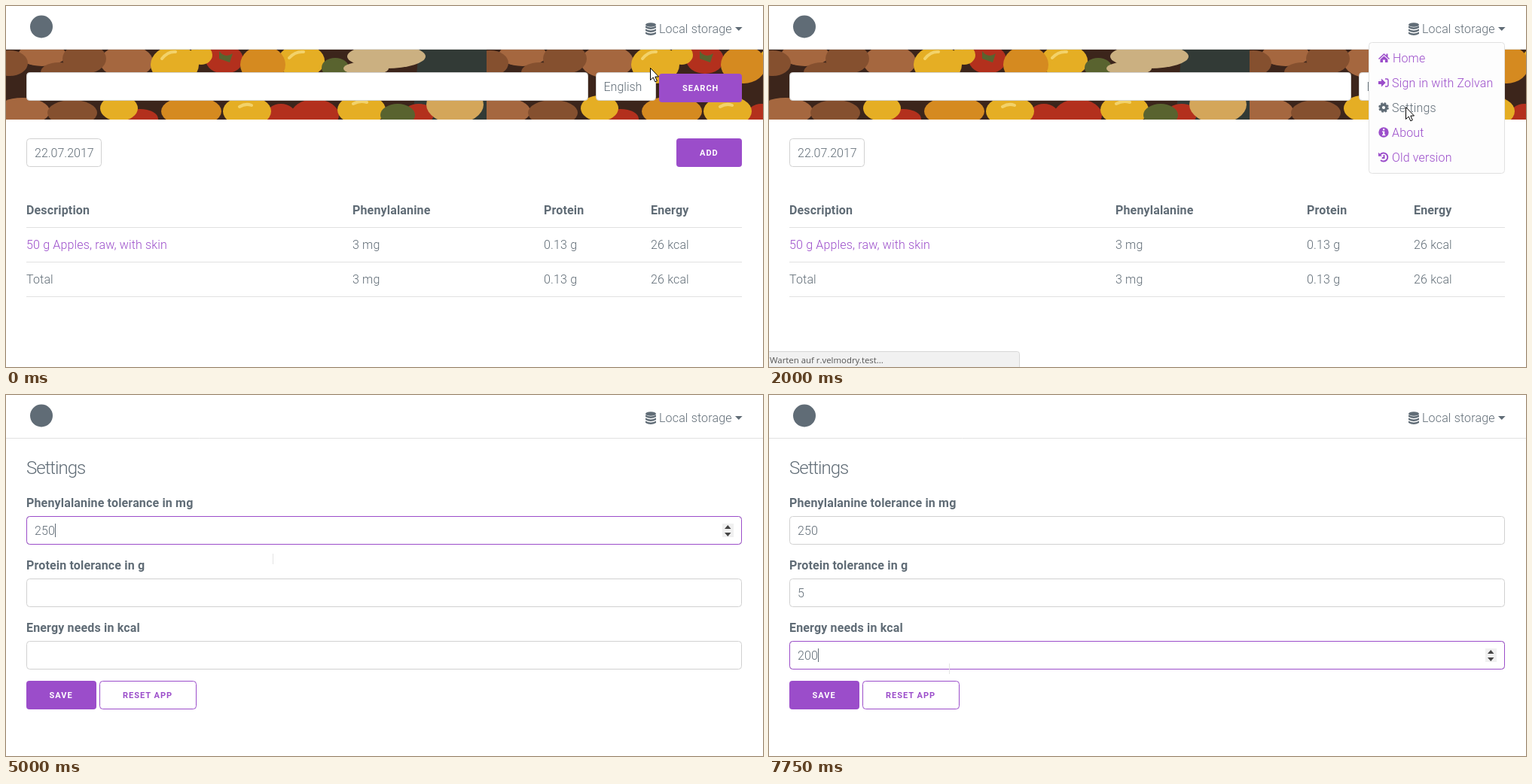
These frames come from a looping animation (1005x480 px, 8000 ms). An HTML page:

```html
<!DOCTYPE html>
<html lang="en">
<head>
<meta charset="utf-8">
<title>Diet diary settings</title>
<style>
html, body { margin: 0; width: 100%; height: 100%; overflow: hidden; background: #fff; }
svg { display: block; color: #606c76; }
text { font: 300 16px Roboto, "Liberation Sans", sans-serif; letter-spacing: .16px; fill: currentColor; white-space: pre; }
.b { font-weight: 700; }
.v { letter-spacing: 0; }
.btn { font-size: 11px; font-weight: 700; letter-spacing: 1px; }
.title { font-size: 24px; letter-spacing: -1px; }
.status text { font: 400 11.4px "Open Sans", "Noto Sans", sans-serif; letter-spacing: 0; fill: #555; }
.link { color: #9b4dca; }
.ink { fill: currentColor; }
.line { fill: none; stroke: currentColor; }
.box { fill: #fff; stroke: #d1d1d1; }
.focus .ring { fill: none; stroke: #9b4dca; }
.rule { stroke: #e1e1e1; }

/* 32 steps of 250 ms: one step is 3.125% */
.t { animation: 8s step-end infinite; }
.home { animation-name: home; }
.settings { animation-name: settings; }
.menu { animation-name: menu; }
.hover-home { animation-name: hover-home; }
.hover-sign { animation-name: hover-sign; }
.hover-set { animation-name: hover-set; }
.status { animation-name: status; }
.waiting { animation-name: waiting; }
.connecting { animation-name: connecting; }
.focus1 { animation-name: focus1; }
.focus2 { animation-name: focus2; }
.focus3 { animation-name: focus3; }
.key1 { animation-name: key1; }
.key2 { animation-name: key2; }
.key3 { animation-name: key3; }
.key4 { animation-name: key4; }
.key5 { animation-name: key5; }
.key6 { animation-name: key6; }
.key7 { animation-name: key7; }
.caret { animation-name: caret; }
.cursor { animation-name: cursor; }
.arrow { animation-name: arrow; }
.hand { animation-name: hand; }
.beam { animation-name: beam; }

@keyframes home { from { opacity: 1 } 28.125%, to { opacity: 0 } }
@keyframes settings { from { opacity: 0 } 28.125%, to { opacity: 1 } }
@keyframes menu { from { opacity: 0 } 9.375% { opacity: 1 } 28.125%, to { opacity: 0 } }
@keyframes hover-home { 12.5% { color: #606c76 } from, 15.625%, to { color: #9b4dca } }
@keyframes hover-sign { 15.625% { color: #606c76 } from, 18.75%, to { color: #9b4dca } }
@keyframes hover-set { 18.75% { color: #606c76 } from, 28.125%, to { color: #9b4dca } }
@keyframes status { from { opacity: 0 } 21.875% { opacity: 1 } 56.25%, to { opacity: 0 } }
@keyframes waiting { from { opacity: 1 } 37.5%, to { opacity: 0 } }
@keyframes connecting { from { opacity: 0 } 37.5%, to { opacity: 1 } }
@keyframes focus1 { from { opacity: 0 } 40.625% { opacity: 1 } 68.75%, to { opacity: 0 } }
@keyframes focus2 { from { opacity: 0 } 68.75% { opacity: 1 } 81.25%, to { opacity: 0 } }
@keyframes focus3 { from { opacity: 0 } 81.25%, to { opacity: 1 } }
@keyframes key1 { from { opacity: 0 } 53.125%, to { opacity: 1 } }
@keyframes key2 { from { opacity: 0 } 56.25%, to { opacity: 1 } }
@keyframes key3 { from { opacity: 0 } 59.375%, to { opacity: 1 } }
@keyframes key4 { from { opacity: 0 } 71.875%, to { opacity: 1 } }
@keyframes key5 { from { opacity: 0 } 90.625%, to { opacity: 1 } }
@keyframes key6 { from { opacity: 0 } 93.75%, to { opacity: 1 } }
@keyframes key7 { from { opacity: 0 } 96.875%, to { opacity: 1 } }
@keyframes caret {
  from { opacity: 0; transform: translate(38px, 171px) }
  40.625% { opacity: 1; transform: translate(38px, 171px) }
  46.875% { opacity: 0; transform: translate(38px, 171px) }
  50% { opacity: 1; transform: translate(38px, 171px) }
  53.125% { opacity: 1; transform: translate(47px, 171px) }
  56.25% { opacity: 1; transform: translate(56px, 171px) }
  59.375% { opacity: 1; transform: translate(65px, 171px) }
  68.75% { opacity: 1; transform: translate(38px, 254px) }
  71.875% { opacity: 1; transform: translate(47px, 254px) }
  81.25% { opacity: 1; transform: translate(38px, 337px) }
  90.625% { opacity: 1; transform: translate(47px, 337px) }
  93.75% { opacity: 1; transform: translate(56px, 337px) }
  96.875%, to { opacity: 1; transform: translate(65px, 337px) }
}
@keyframes cursor {
  from { transform: translate(855px, 82px) }
  3.125% { transform: translate(878px, 55px) }
  6.25% { transform: translate(902px, 23px) }
  12.5% { transform: translate(890px, 64px) }
  15.625% { transform: translate(864px, 101px) }
  18.75% { transform: translate(845px, 134px) }
  34.375% { transform: translate(640px, 152px) }
  37.5% { transform: translate(430px, 182px) }
  40.625% { transform: translate(356px, 193px) }
  62.5% { transform: translate(354px, 218px) }
  65.625% { transform: translate(350px, 265px) }
  78.125% { transform: translate(290px, 315px) }
  81.25%, to { transform: translate(239px, 364px) }
}
@keyframes arrow { from { opacity: 1 } 6.25% { opacity: 0 } 25% { opacity: 1 } 37.5%, to { opacity: 0 } }
@keyframes hand { from { opacity: 0 } 6.25% { opacity: 1 } 25%, to { opacity: 0 } }
@keyframes beam { from { opacity: 0 } 37.5%, to { opacity: 1 } }
</style>
</head>
<body>
<svg width="1005" height="480" viewBox="0 0 1005 480">
  <defs>
    <pattern id="food" y="58" width="638" height="93" patternUnits="userSpaceOnUse">
      <path fill="#3c251b" d="M0 0H638V93H0Z"/>
      <path fill="#323a36" d="M548 0H638V93H540Z"/>
      <g fill="#a5673f">
        <ellipse cx="48" cy="7" rx="32" ry="15"/>
        <ellipse cx="160" cy="16" rx="35" ry="22"/>
        <ellipse cx="22" cy="82" rx="36" ry="18"/>
      </g>
      <g fill="#85502f">
        <ellipse cx="5" cy="18" rx="24" ry="17"/>
        <ellipse cx="104" cy="12" rx="29" ry="20"/>
        <ellipse cx="88" cy="84" rx="33" ry="17"/>
        <ellipse cx="70" cy="30" rx="24" ry="13"/>
      </g>
      <g fill="#b3301d">
        <ellipse cx="290" cy="13" rx="25" ry="19"/>
        <ellipse cx="178" cy="92" rx="24" ry="13"/>
        <ellipse cx="365" cy="88" rx="20" ry="16"/>
        <ellipse cx="410" cy="87" rx="32" ry="21"/>
        <ellipse cx="548" cy="86" rx="20" ry="14"/>
      </g>
      <g fill="#e5ae24">
        <ellipse cx="224" cy="20" rx="32" ry="25"/>
        <ellipse cx="259" cy="7" rx="15" ry="13"/>
        <ellipse cx="392" cy="15" rx="31" ry="22"/>
        <ellipse cx="150" cy="78" rx="25" ry="17"/>
        <ellipse cx="320" cy="82" rx="32" ry="20"/>
        <ellipse cx="472" cy="80" rx="32" ry="20"/>
      </g>
      <g fill="#d58a20">
        <ellipse cx="341" cy="20" rx="30" ry="25"/>
        <ellipse cx="246" cy="82" rx="40" ry="20"/>
      </g>
      <g fill="#59632f">
        <ellipse cx="437" cy="24" rx="18" ry="13"/>
        <ellipse cx="520" cy="87" rx="23" ry="15"/>
        <path d="M283 2q8 10 18 3l-4 12-14-5Z"/>
      </g>
      <g fill="#cbb081">
        <ellipse cx="505" cy="9" rx="52" ry="16"/>
        <ellipse cx="478" cy="25" rx="30" ry="9"/>
        <ellipse cx="596" cy="73" rx="38" ry="25" fill="#d4a65a"/>
      </g>
      <g fill="none" stroke="#f3d269" stroke-width="4" stroke-linecap="round">
        <path d="M207 12q8-10 18-9M376 11q8-9 19-8M461 72q9-5 18-2M310 76q8-5 16-2"/>
      </g>
    </pattern>
    <g id="spinner">
      <path fill="#f0f0f0" d="M951 10h15v18h-15Z"/>
      <path fill="#444" d="M954 17l4.3-5 4.2 5ZM954 22l4.3 5 4.2-5Z"/>
    </g>
    <rect id="field" x="27.5" y=".5" width="949" height="37" rx="4"/>
  </defs>

  <g class="t home">
    <path fill="url(#food)" d="M0 58H1005V151H0Z"/>
    <rect class="box" x="27.5" y="88.5" width="745" height="37" rx="4"/>
    <rect class="box" x="783.5" y="88.5" width="79" height="37" rx="4"/>
    <text class="v" x="793.5" y="113">English</text>
    <g fill="#9b4dca">
      <rect x="867" y="90" width="110" height="38" rx="4"/>
      <rect x="890" y="176" width="87" height="38" rx="4"/>
    </g>
    <g color="#fff">
      <text class="btn" x="898" y="113">SEARCH</text>
      <text class="btn" x="921" y="199">ADD</text>
    </g>
    <rect class="box" x="27.5" y="176.5" width="99" height="37" rx="4"/>
    <text class="v" x="38" y="201">22.07.2017</text>
    <text class="b" x="27" y="277">Description</text>
    <text class="b" x="460" y="277">Phenylalanine</text>
    <text class="b" x="714" y="277">Protein</text>
    <text class="b" x="856" y="277">Energy</text>
    <path class="rule" d="M27 294.5H977M27 340.5H977M27 386.5H977"/>
    <text class="link" x="27" y="323">50 g Apples, raw, with skin</text>
    <text x="460" y="323">3 mg</text>
    <text x="714" y="323">0.13 g</text>
    <text x="856" y="323">26 kcal</text>
    <text x="27" y="369">Total</text>
    <text x="460" y="369">3 mg</text>
    <text x="714" y="369">0.13 g</text>
    <text x="856" y="369">26 kcal</text>
  </g>

  <g class="t settings">
    <text class="title" x="27" y="105">Settings</text>
    <text class="b" x="27" y="149">Phenylalanine tolerance in mg</text>
    <text class="b" x="27" y="232">Protein tolerance in g</text>
    <text class="b" x="27" y="315">Energy needs in kcal</text>
    <g transform="translate(0 161)">
      <use href="#field" class="box"/>
      <g class="t focus focus1"><use href="#field" class="ring"/><use href="#spinner"/></g>
      <text class="v t key1" x="38" y="25">2</text>
      <text class="v t key2" x="47" y="25">5</text>
      <text class="v t key3" x="56" y="25">0</text>
    </g>
    <g transform="translate(0 244)">
      <use href="#field" class="box"/>
      <g class="t focus focus2"><use href="#field" class="ring"/><use href="#spinner"/></g>
      <text class="v t key4" x="38" y="25">5</text>
    </g>
    <g transform="translate(0 327)">
      <use href="#field" class="box"/>
      <g class="t focus focus3"><use href="#field" class="ring"/><use href="#spinner"/></g>
      <text class="v t key5" x="38" y="25">2</text>
      <text class="v t key6" x="47" y="25">0</text>
      <text class="v t key7" x="56" y="25">0</text>
    </g>
    <path class="t caret" stroke="#606c76" d="M.5 0V18"/>
    <rect x="27" y="380" width="93" height="38" rx="4" fill="#9b4dca"/>
    <rect x="124.5" y="380.5" width="128" height="37" rx="4" fill="#fff" stroke="#9b4dca"/>
    <text class="btn" color="#fff" x="57.5" y="403">SAVE</text>
    <text class="btn link" x="155" y="403">RESET APP</text>
  </g>

  <path class="rule" d="M0 57.5H1005"/>
  <circle class="ink" cx="47" cy="27.5" r="15"/>
  <g class="ink">
    <ellipse cx="856" cy="25" rx="7" ry="2.8"/>
    <path id="disc" d="M849 26.5q7 4 14 0v2.4q-7 4-14 0Z"/>
    <use href="#disc" y="4"/>
    <use href="#disc" y="8"/>
    <path d="M968 28h9.6l-4.8 5Z"/>
  </g>
  <text x="867" y="36">Local storage</text>

  <g class="t menu">
    <rect x="796.5" y="48.5" width="180" height="174" rx="4" fill="#fdfdfd" stroke="#e1e1e1"/>
    <g class="link t hover-home" transform="translate(809 69)">
      <path class="ink" d="M0 1 7.5-6 10.5-3.2V-5.5H12.5V-1.3L15 1 14 2 7.5-4 1 2ZM2.5 2 7.5-2.5 12.5 2V6H9V2.5H6V6H2.5Z"/>
      <text x="19" y="6">Home</text>
    </g>
    <g class="link t hover-sign" transform="translate(809 102)">
      <path class="ink" d="M0-2H4V-5.5L9.7 0 4 5.5V2H0Z"/>
      <path class="line" stroke-width="1.5" d="M9-5H11.3Q13-5 13-3.3V3.3Q13 5 11.3 5H9"/>
      <text x="18" y="6">Sign in with Zolvan</text>
    </g>
    <g class="link t hover-set" transform="translate(809 135)">
      <circle class="line" cx="7" r="3.8" stroke-width="3.4"/>
      <circle class="line" cx="7" r="5.8" stroke-width="2" stroke-dasharray="2.6 1.955"/>
      <text x="18" y="6">Settings</text>
    </g>
    <g class="link" transform="translate(809 168)">
      <circle class="ink" cx="7" r="6.7"/>
      <path fill="#fff" d="M6-4.7H8.3V-2.7H6ZM5-1.6H8.3V2.8H9.3V4.3H5V2.8H6V-.2H5Z"/>
      <text x="18" y="6">About</text>
    </g>
    <g class="link" transform="translate(809 201)">
      <path class="line" stroke-width="2" d="M2.5-3.4A5.5 5.5 0 1 1 3 4M7.5-3V1H4.7"/>
      <path class="ink" d="M0-6.2V-1.2H5Z"/>
      <text x="18" y="6">Old version</text>
    </g>
  </g>

  <g class="t status">
    <path fill="#f1f1f1" stroke="#d6d6d6" d="M-1 459.5H329.5q3 0 3 3V481H-1Z"/>
    <text class="t waiting" x="1" y="475">Warten auf r.velmodry.test...</text>
    <text class="t connecting" x="1" y="475">Verbindung wird hergestellt...</text>
  </g>

  <g class="t cursor">
    <path class="t arrow" fill="#fff" stroke="#000" d="M.5.5V16.5L4.2 13 6.8 18.8 9.3 17.7 6.8 12H11.5Z"/>
    <path class="t hand" fill="#fff" stroke="#000" stroke-linejoin="round" d="M-1.5 14V2a1.7 1.7 0 0 1 3.4 0V8q2.6-1.2 3.2.8 2.4-1 3 .9 2.2-.6 2.4 1.6V16q0 3-1.8 5V23.5H0V21L-5.3 14.5q-1.2-2 .4-2.7 1.3-.4 3.4 2.2ZM1.9 8V12M5.1 9V12M8.1 10V12.5"/>
    <path class="t beam" fill="none" stroke="#e4e4e4" d="M.5-7V7"/>
  </g>
</svg>
</body>
</html>
```
